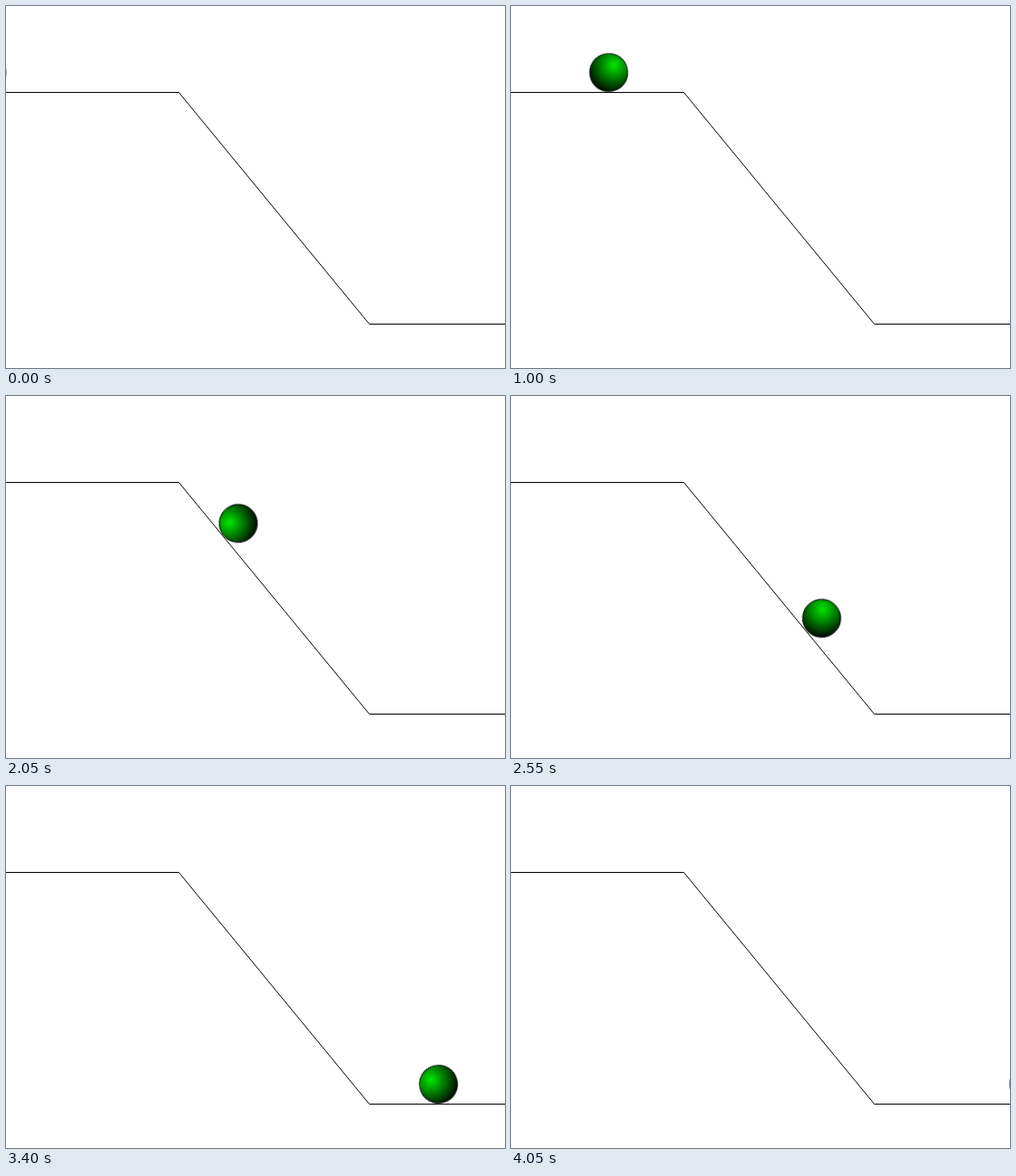
Animation of 550 by 400 pixels, one loop 4.1 s. Source, as an HTML page:

```html
<!DOCTYPE html>
<html lang="en">
<head>
<meta charset="utf-8">
<title>Rolling ball</title>
<style>
  html, body { margin: 0; width: 100%; height: 100%; overflow: hidden; background: #fff; }
  svg { display: block; }

  /* 82 steps of 50 ms; the tiny negative delay keeps step edges clear of rounding. */
  .move, .spin { animation: 4100ms -2ms infinite; }
  .move { animation-name: move; }
  .spin { animation-name: spin; }

  @keyframes move {
    0%        { transform: translate(-21px, 73.5px);    animation-timing-function: steps(28); }
    34.14634% { transform: translate(159.2px, 73.5px);  animation-timing-function: steps(2); }
    36.58537% { transform: translate(172px, 74px);      animation-timing-function: steps(3); }
    40.2439%  { transform: translate(191.3px, 75.2px);  animation-timing-function: steps(2); }
    42.68293% { transform: translate(204.2px, 77.8px);  animation-timing-function: steps(24); }
    71.95122% { transform: translate(411.5px, 329.5px); animation-timing-function: steps(23); }
    100%      { transform: translate(578.1px, 329.5px); }
  }

  @keyframes spin {
    0%        { transform: rotate(225deg);  animation-timing-function: steps(35); }
    42.68293% { transform: rotate(995deg);  animation-timing-function: steps(24); }
    71.95122% { transform: rotate(2075deg); animation-timing-function: steps(23); }
    100%      { transform: rotate(2828deg); }
  }
</style>
</head>
<body>
<svg width="550" height="400" viewBox="0 0 550 400">
  <defs>
    <radialGradient id="shade" gradientUnits="userSpaceOnUse" cx="10" cy="0" r="32">
      <stop offset="0" stop-color="#00e800"/>
      <stop offset="1" stop-color="#000"/>
    </radialGradient>
  </defs>
  <path d="M-1 95.5H190.5L400.5 351.5H551" fill="none" stroke="#000"/>
  <g class="move">
    <circle class="spin" r="21" fill="url(#shade)" stroke="#000"/>
  </g>
</svg>
</body>
</html>
```
